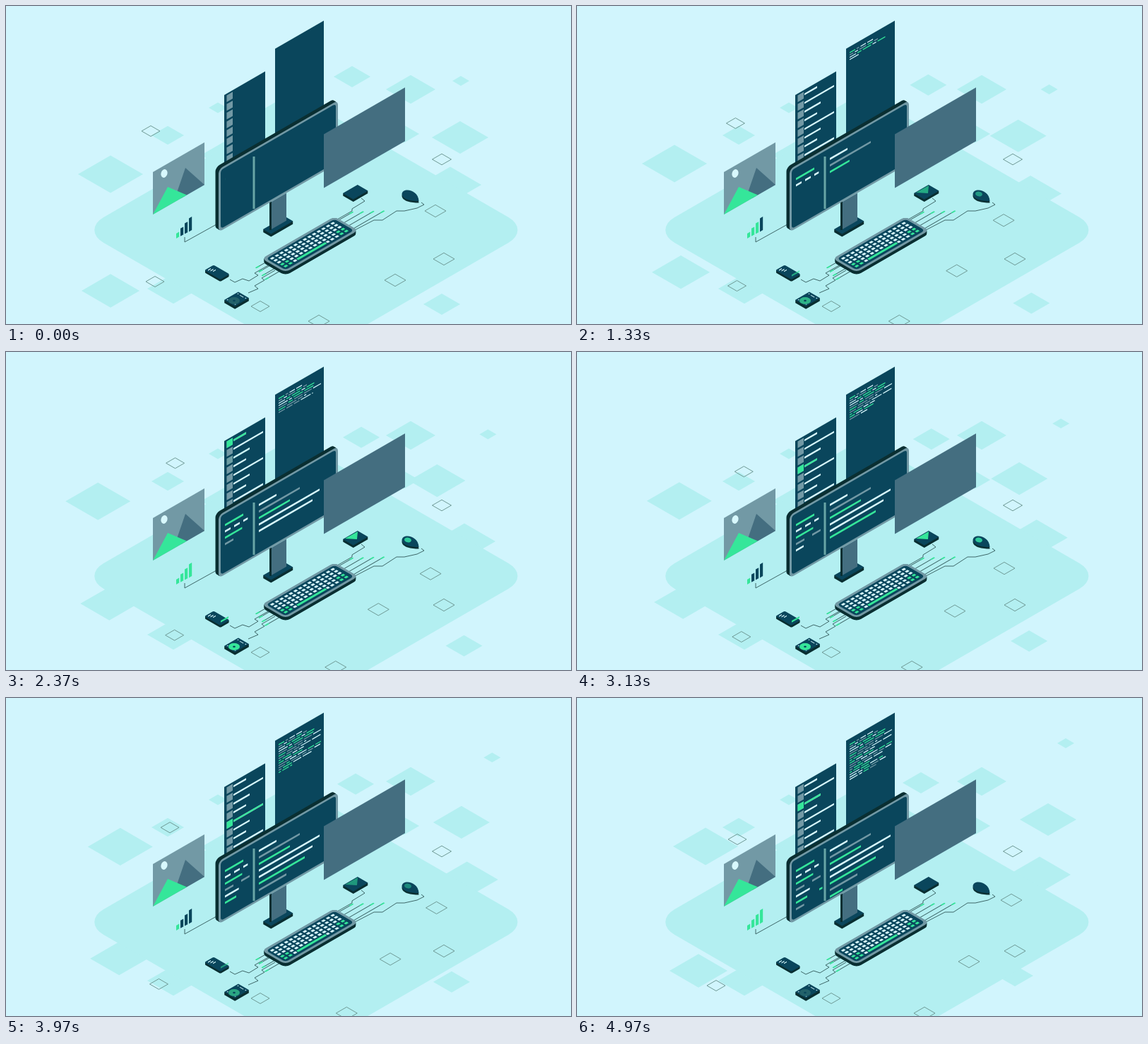
An HTML page with a canvas that plays this animation: 800x450 px, repeating every 5010 ms.

```html
<!DOCTYPE html>
<html lang="en">
<head>
<meta charset="utf-8">
<title>Isometric workstation</title>
<style>
html, body { margin: 0; width: 100%; height: 100%; overflow: hidden; background: #d1f5fd; }
canvas { display: block; width: 800px; height: 450px; }
</style>
</head>
<body>
<canvas id="stage" width="800" height="450"></canvas>
<script>
const ctx = document.getElementById('stage').getContext('2d');
const LOOP = 5010, SLOPE = 0.577;
const SKY = '#d1f5fd', PALE = '#b3eff1', NAVY = '#0a465c', EDGE = '#0a2f32', STEEL = '#7299a5',
      SLATE = '#446e80', GREEN = '#35e69a', WHITE = '#d8f8fd', WIRE = '#31585a';

const ramp = (t, a, b) => Math.max(0, Math.min(1, (t - a) / (b - a)));
const mix = (a, b, k) => a.map((v, i) => v + (b[i] - v) * k);

// Straight run to a turning point, then straight on to the end
const drift = (w, from, turn, to, mid = 2400) => ({
  w, at: t => t < mid ? mix(from, turn, t / mid) : mix(turn, to, (t - mid) / (LOOP - 40 - mid))
});
const still = (w, x, y) => ({ w, at: () => [x, y] });

const tiles = [
  drift(46, [148, 238], [130, 211], [182, 210]),
  drift(40, [643, 186], [610, 182], [667, 172]),
  drift(26, [490, 100], [505, 124], [487, 120], 2730),
  drift(12, [644, 106], [681, 124], [692, 64], 2000),
  drift(41, [148, 403], [146, 348], [172, 386], 2780),
  drift(26, [617, 422], [654, 420], [620, 393], 1870),
  drift(44, [629, 253], [648, 271], [655, 250], 1930),
  still(37, 237, 400), still(35, 573, 118), still(23, 229, 183), still(13, 300, 144),
  still(22, 563, 181), still(60, 400, 160), still(34, 310, 211)
];
const outlines = [
  drift(13, [205, 177], [240, 157], [227, 200]),
  drift(15, [608, 290], [601, 314], [615, 286]),
  drift(15, [551, 388], [527, 364], [555, 373]),
  drift(13, [211, 390], [242, 402], [197, 407], 2660),
  drift(15, [443, 446], [467, 446], [492, 446]),
  still(13.5, 617, 217), still(15, 620, 358), still(13, 360, 425)
];

let seed = 11;
const rand = () => (seed = (seed * 16807) % 2147483647) / 2147483647;
const code = Array.from({ length: 16 }, () => {
  const parts = [], end = 415 + rand() * 31;
  for (let x = 386; x < end;) {
    const w = Math.min(3 + rand() * 11, 446 - x);
    parts.push([x, w, [GREEN, WHITE, STEEL][Math.floor(rand() * 3)]]);
    x += w + 2;
  }
  return parts;
});

// Wires to mail, pin, card, drive and chart
const cables = [
  'M469 302L490 290V287L508 276L503 272',
  'M494 317L521 303H533L553 290H564L582 286L592 281L588 278',
  'M371 367L352 378L357 381L344 389L335 386L324 391L317 387',
  'M381 374L362 385L366 388L352 396L357 400L343 406',
  'M253 327V334L298 309'
].map(d => new Path2D(d));

function poly(color, ...pts) {
  ctx.beginPath();
  for (let i = 0; i < pts.length; i += 2) ctx.lineTo(pts[i], pts[i + 1]);
  ctx.closePath();
  ctx.fillStyle = color;
  ctx.fill();
}
function diamond(color, [x, y], w) {
  const h = w * SLOPE;
  poly(color, x - w, y, x, y - h, x + w, y, x, y + h);
}
// Upright sheet that rises to the right
function sheet(color, x, y, w, h) {
  poly(color, x, y, x + w, y - w * SLOPE, x + w, y - w * SLOPE + h, x, y + h);
}
function bar(color, x, y, w, thick) {
  if (w > 0) sheet(color, x, y - thick / 2, w, thick);
}
function ellipse(color, x, y, rx, ry, turn = 0) {
  ctx.beginPath();
  ctx.ellipse(x, y, rx, ry, turn, 0, Math.PI * 2);
  ctx.fillStyle = color;
  ctx.fill();
}
function box(color, x, y, w, h, r = 0) {
  ctx.beginPath();
  ctx.roundRect(x, y, w, h, r);
  ctx.fillStyle = color;
  ctx.fill();
}
function fade(alpha, draw) {
  ctx.save();
  ctx.globalAlpha = alpha;
  draw();
  ctx.restore();
}
function plane(ax, ay, bx, by, x, y, draw) {
  ctx.save();
  ctx.transform(ax, ay, bx, by, x, y);
  draw();
  ctx.restore();
}
const floor = (x, y, draw) => plane(0.866, -0.5, 0.866, 0.5, x, y, draw);
const wall = (x, y, draw) => plane(1, -SLOPE, 0, 1, x, y, draw);

// Thick plate lying on the floor; x, y is its left corner
function slab(color, x, y, u, v, depth, r = 0) {
  for (let d = depth; d >= 0; d -= 0.5)
    floor(x, y + d, () => box(d ? EDGE : color, 0, 0, u, v, r));
}

function ground(t) {
  ctx.fillStyle = SKY;
  ctx.fillRect(0, 0, 800, 450);
  for (const { w, at } of tiles) diamond(PALE, at(t), w);
  floor(107, 317, () => box(PALE, 0, 0, 367, 367, 36));
  ctx.strokeStyle = '#6f9a96';
  ctx.lineWidth = 1;
  for (const { w, at } of outlines) {
    diamond('transparent', at(t), w);
    ctx.stroke();
  }
}

function codePanel(t) {
  sheet(NAVY, 381, 60.5, 69, 124);
  code.forEach((parts, i) => {
    const limit = 386 + 61 * ramp((t - 400) / 290, i, i + 1);
    for (const [x, w, color] of parts)
      bar(color, x, 66 + i * 3.3 - (x - 386) * SLOPE, Math.min(w, limit - x), 1.4);
  });
}

function listPanel(t) {
  sheet(NAVY, 309, 126, 58, 100);
  for (let i = 0; i < 8; i++) {
    const y = 126.5 + i * 12.3;
    const w = [18, 42, 23][i % 3] * ramp(t, 60 + i * 50, 350 + i * 50);
    const row = color => {
      sheet(color === WHITE ? STEEL : color, 312.5, y, 8.5, 9.5);
      bar(color, 322, y - 1.5, w, 2.6);
    };
    row(WHITE);
    // The highlight hops from row to row.
    [2, 0, 3, 4, 2].forEach((hit, k) => {
      const on = 1500 + k * 740;
      if (hit === i) fade(ramp(t, on, on + 130) * ramp(t, on + 880, on + 750), () => row(GREEN));
    });
  }
}

function menuText(t) {
  const colors = [STEEL, WHITE, GREEN];
  for (let i = 0; i < 7; i++) {
    const broken = i % 2;
    const full = broken ? 31 + i * 1.3 : 26 - i * i * 0.4;
    const w = full * ramp(t, i * 720, i * 720 + 450);
    const word = broken ? 6 + i * 2 : full, step = broken ? 8 + i * 5 : full;
    for (let x = 0; x < w; x += step)
      bar(i ? colors[i % 3] : GREEN, 310 + x, 245 + i * 9 - x * SLOPE, Math.min(word, w - x), 2.8);
  }
}

function bodyText(t) {
  const colors = [WHITE, STEEL, GREEN, WHITE, WHITE, GREEN, STEEL, GREEN];
  [25, 58, 44, 86, 76, 65, 39, 18].forEach((w, i) => {
    const start = 850 + 68 * i * i;
    bar(colors[i], 358, 216.5 + i * 9.25, w * ramp(t, start, start + 330), 2.8);
  });
}

function monitor(t) {
  slab(NAVY, 364, 316, 36, 13, 4);
  sheet(SLATE, 374, 278, 23, 39);
  box(EDGE, 373, 276, 3, 41);
  for (let i = 5; i > 0; i--)
    wall(301 - i * 0.9, 231 - i * 0.55, () => box(EDGE, 0, 0, 169, 89, 6));
  wall(301, 231, () => {
    box(STEEL, 0, 0, 169, 89, 6);
    box(NAVY, 3, 3, 163, 83, 4);
  });
  box('#68a5a6', 349.5, 213, 3, 74);
  menuText(t);
  bodyText(t);
}

function picture() {
  sheet(STEEL, 208, 235, 73, 60);
  ellipse(WHITE, 224, 237, 4.5, 6, 0.3);
  poly(SLATE, 254, 229, 281, 253, 248, 272, 242, 264);
  poly(GREEN, 229, 256, 256, 267.5, 208, 295);
}

function chart(t) {
  const phase = t % 3200;
  const lit = phase < 2800 ? 1 + Math.floor(3.99 * ramp(phase, 600, 1850)) : 1;
  for (let i = 0; i < 4; i++) {
    const h = 7 + i * 4;
    sheet(i < lit ? GREEN : NAVY, 241 + i * 6, 329 - i * 3.2 - h, 4.2, h);
  }
}

function keyboard() {
  slab(STEEL, 362, 357.5, 119, 39, 4.5, 7);
  floor(362, 357.5, () => {
    box(NAVY, 3.5, 3.5, 112, 32, 5);
    for (let r = 0; r < 5; r++)
      for (let c = 0; c < 14; c++) {
        const green = r > 2 && (c < 2 || c > 11);
        box(green ? GREEN : WHITE, 7 + c * 7.6, 6.5 + r * 5.5, 4.6, 3.3);
      }
    box(NAVY, 27, 27.5, 49, 5);
    box(GREEN, 28, 28.5, 47, 3.3);
  });
}

function circuits() {
  ctx.strokeStyle = WIRE;
  ctx.lineWidth = 0.9;
  cables.forEach(c => ctx.stroke(c));
  floor(362, 357.5, () => {
    for (let i = 0; i < 4; i++) {
      const v = 8 + i * 8, right = 140 + i * 9, left = -18 - i * 3;
      box(WIRE, left, v, right - left, 1);
      box(GREEN, right - 5, v - 0.5, 6, 2);
      box(GREEN, left, v - 0.5, 6, 2);
    }
  });
}

function pin(color, y) {
  ctx.beginPath();
  ctx.moveTo(584.5, 276 + y);
  ctx.bezierCurveTo(574, 276 + y, 561, 274 + y, 560.5, 266 + y);
  ctx.bezierCurveTo(562, 256 + y, 584, 260 + y, 584.5, 276 + y);
  ctx.fillStyle = color;
  ctx.fill();
}

function icons(t) {
  slab(NAVY, 477, 265, 24, 17, 3.5);
  pin(EDGE, 2.5);
  pin(NAVY, 0);
  slab(NAVY, 281, 374, 15, 26, 3, 2);
  for (let i = 0; i < 3; i++) bar(WHITE, 286 + i * 3.5, 374 + i * 0.8, 4, 1.3);
  slab(NAVY, 309, 416, 23, 17.5, 4);
  floor(309, 416, () => {
    for (const u of [3, 20])
      for (const v of [2.5, 15]) box(WHITE, u - 0.7, v - 0.7, 1.4, 1.4);
    box(WHITE, 19, 6, 1, 6);
  });
  ellipse('#23626a', 323, 417, 8, 5);

  fade(ramp(t, 200, 2000) * ramp(t, 4850, 3150), () => {
    poly(GREEN, 480, 264, 498, 254, 497, 265);
    ellipse('#2cc99a', 569, 266, 5, 3.4, 0.15);
    bar(GREEN, 304, 381.5, 11, 2.5);
    ellipse(GREEN, 323, 417, 8, 5);
  });
  ellipse(NAVY, 323, 417, 1.8, 1.2);
}

function draw(t) {
  ground(t);
  codePanel(t);
  listPanel(t);
  circuits();
  monitor(t);
  sheet(SLATE, 450, 181.5, 115, 76);
  picture();
  chart(t);
  keyboard();
  icons(t);
}

function tick() {
  draw(performance.now() % LOOP);
  requestAnimationFrame(tick);
}
tick();
</script>
</body>
</html>
```
